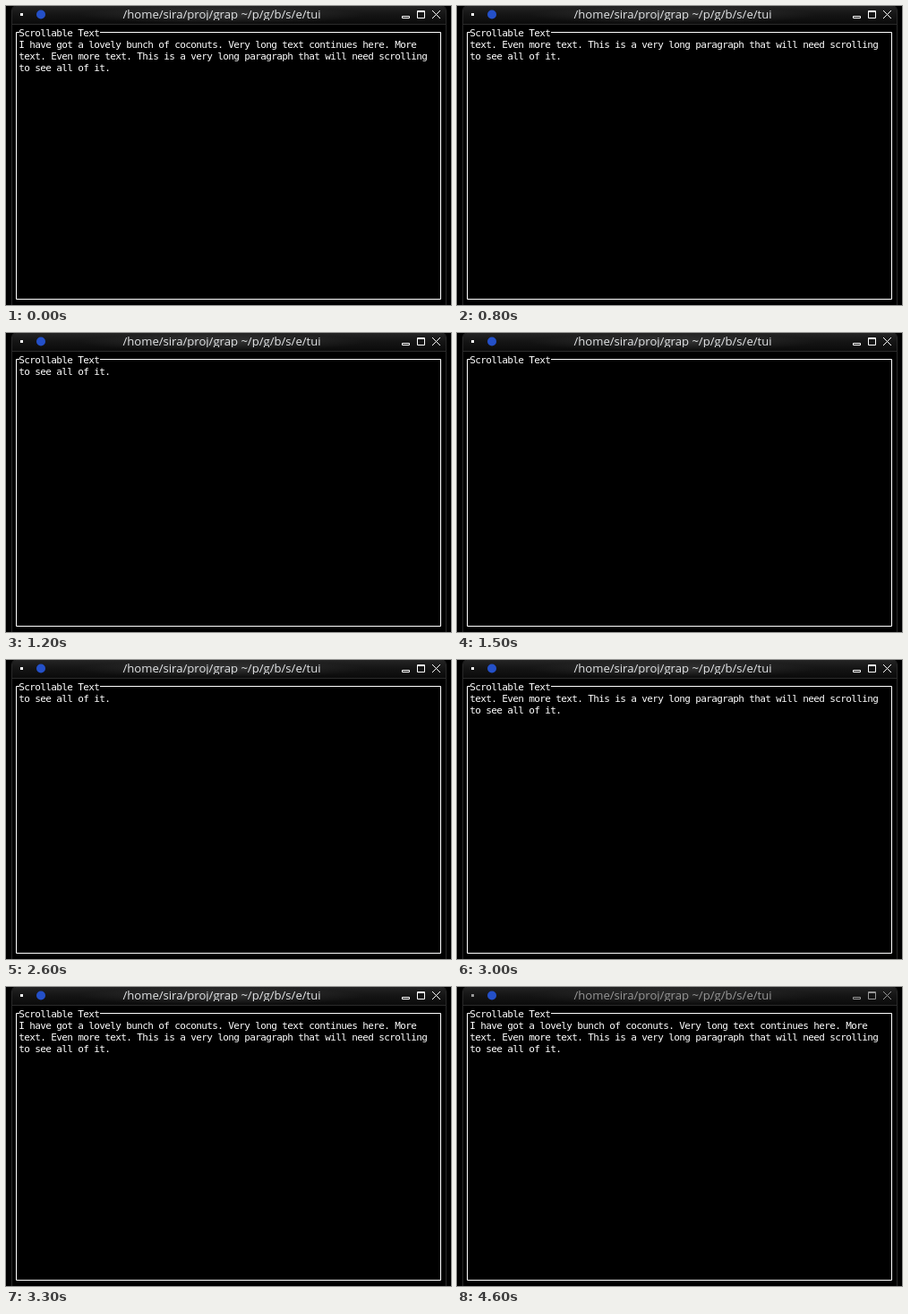
Recreate the animation shown at these times as an HTML page. Size 497 by 335 pixels, loop 5.1 s.

```html
<!DOCTYPE html>
<html lang="en">
<head>
<meta charset="utf-8">
<title>Scrollable text</title>
<style>
  html, body { margin: 0; width: 100%; height: 100%; overflow: hidden; background: #000; }
  svg { display: block; }
  .cell { font: 11px "DejaVu Sans Mono", monospace; fill: #fff; text-anchor: middle; }
  .title { font: 13.1px "Open Sans", sans-serif; text-anchor: middle; fill: var(--ink); }
  #bar { --ink: #e2e4e6; --sign: #fff; }
  #bar.idle { --ink: #969696; --sign: #999; }
  #bar .glow { opacity: 1; }
  #bar.idle .glow { opacity: .7; }
  .sign { fill: var(--sign); }
  .line { fill: none; stroke: var(--sign); }
</style>
</head>
<body>
<svg width="497" height="335" viewBox="0 0 497 335">
  <defs>
    <linearGradient id="shade" x2="0" y2="1">
      <stop offset="0" stop-color="#242424"/>
      <stop offset=".5" stop-color="#141414"/>
      <stop offset="1" stop-color="#0b0b0b"/>
    </linearGradient>
    <radialGradient id="light">
      <stop offset="0" stop-color="#fff" stop-opacity=".13"/>
      <stop offset="1" stop-color="#fff" stop-opacity="0"/>
    </radialGradient>
    <clipPath id="cut"><rect x="7" width="484" height="16"/></clipPath>
  </defs>

  <rect width="497" height="335"/>
  <path d="M6.5 335V5Q6.5 1 10 0M491.5 335V5Q491.5 1 488 0" fill="none" stroke="#292929"/>

  <g id="bar">
    <path d="M7 20V5Q7 1 11 0H487Q491 1 491 5V20Z" fill="url(#shade)"/>
    <rect class="glow" x="80" width="322" height="20" fill="url(#light)"/>
    <rect class="sign" x="16" y="8" width="3" height="3"/>
    <circle cx="39" cy="9.5" r="5" fill="#2450c8"/>
    <g clip-path="url(#cut)">
      <text class="title" x="241" y="14">/home/sira/proj/grap ~/p/g/b/s/e/tui</text>
    </g>
    <path class="line" d="M442.5 11.5h8v2h-8zM459.5 5.5h8v8h-8zM459 6.5h9M476 5l9 9M485 5l-9 9"/>
  </g>
  <path d="M7 20.5H491" stroke="#2b2b2b"/>

  <path d="M15 29.5H11.5V328.5H485.5V29.5H105" fill="none" stroke="#fff"/>
  <g id="screen"></g>
</svg>
<script>
  const LOOP = 5100, COL = 6, ROW = 13, LEFT = 15, BASE = 34;
  const lines = [
    "I have got a lovely bunch of coconuts. Very long text continues here. More",
    "text. Even more text. This is a very long paragraph that will need scrolling",
    "to see all of it."
  ];
  // start time, lines scrolled away
  const steps = [[0, 0], [800, 1], [1200, 2], [1500, 3], [2600, 2], [3000, 1], [3300, 0]];
  const IDLE_FROM = 4600;

  const screen = document.getElementById("screen");
  const bar = document.getElementById("bar");

  // One terminal row, each character centred in its cell.
  function addRow(text) {
    const el = document.createElementNS("http://www.w3.org/2000/svg", "text");
    el.setAttribute("class", "cell");
    el.setAttribute("x", [...text].map((_, i) => LEFT + 2.5 + i * COL).join(" "));
    el.setAttribute("y", BASE);
    el.textContent = text;
    screen.append(el);
    return el;
  }

  addRow("Scrollable Text");
  const rows = lines.map(addRow);

  function draw(time) {
    const t = time % LOOP;
    const scroll = steps.findLast(([start]) => t >= start)[1];
    rows.forEach((el, i) => {
      el.style.display = i < scroll ? "none" : "";
      el.setAttribute("y", BASE + ROW * (i - scroll + 1));
    });
    bar.classList.toggle("idle", t >= IDLE_FROM);
  }

  const begin = performance.now();
  function tick() {
    draw(performance.now() - begin);
    requestAnimationFrame(tick);
  }
  tick();
</script>
</body>
</html>
```
